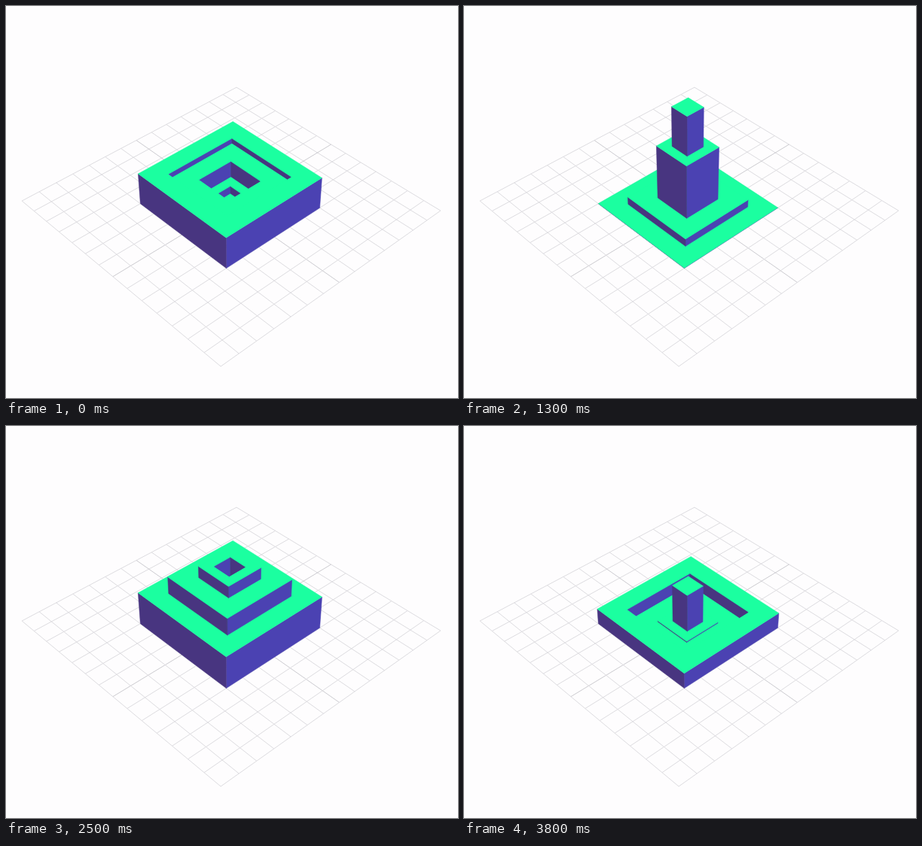
These frames come from a looping animation (600x521 px, 3.9 s). An HTML page with a canvas:

```html
<!DOCTYPE html>
<html lang="en">
<head>
<meta charset="utf-8">
<title>Nested square pistons</title>
<style>
  html, body { margin: 0; width: 100%; height: 100%; overflow: hidden; background: #fefdfe; }
  canvas { display: block; }
</style>
</head>
<body>
<canvas id="stage" width="600" height="521"></canvas>
<script>
const ctx = document.getElementById('stage').getContext('2d');

const LOOP = 3900, STEP = 100, GRID = 7;
const GREEN = '#1bffa0', BLUE = '#4b42b2', DARK = '#483580';

// Half width, half of the top height and phase lag of each ring, outermost first.
const RINGS = [
  { size: 3, amp: 1, lag: 0 },
  { size: 2, amp: 1.5, lag: 0.95 },
  { size: 1, amp: 3, lag: 1.9 },
  { size: 0.5, amp: 3, lag: 2.85 },
];

// Wave phase over time (ms, rad): about 3 rad/s with a slightly uneven pace.
const PHASE = [[0, -0.6], [400, 0.7], [900, 2.03], [1700, 4.56],
               [2500, 6.78], [3100, 8.7], [3800, 10.9], [3900, 11.2]];

function phaseAt(t) {
  const i = PHASE.findIndex(([time]) => time > t);
  const [t0, p0] = PHASE[i - 1], [t1, p1] = PHASE[i];
  return p0 + (p1 - p0) * (t - t0) / (t1 - t0);
}

// Perspective: u runs to the lower right, v to the lower left, h upwards.
function project([u, v, h]) {
  const w = 1 - 0.011286 * u - 0.010314 * v - 0.01306 * h;
  return [
    (297.1 + 15.766 * u - 23.64 * v - 3.92 * h) / w,
    (265.5 + 10.411 * u + 9.743 * v - 24.76 * h) / w,
  ];
}

function trace(...points) {
  ctx.beginPath();
  for (const p of points) ctx.lineTo(...project(p));
}

function face(color, ...points) {
  trace(...points);
  ctx.closePath();
  ctx.fillStyle = ctx.strokeStyle = color;
  ctx.lineWidth = 0.5;
  ctx.fill();
  ctx.stroke();
}

function gridLine(a, b, color) {
  trace(a, b);
  ctx.strokeStyle = color;
  ctx.lineWidth = 1;
  ctx.stroke();
}

function drawGrid() {
  const order = [...Array(2 * GRID + 1).keys()].map(i => i - GRID);
  for (const i of order) {
    const color = i ? '#dddce0' : '#cccbd0';
    gridLine([i, -GRID, 0], [i, GRID, 0], color);
    gridLine([-GRID, i, 0], [GRID, i, 0], color);
  }
}

// Walls with normals +u (blue) and +v (dark), standing at u = at and v = at.
function walls(s, at, low, high) {
  face(BLUE, [at, -s, low], [at, s, low], [at, s, high], [at, -s, high]);
  face(DARK, [-s, at, low], [s, at, low], [s, at, high], [-s, at, high]);
}

// Keep only what shows through a square opening or rises out of it.
function clipOpening(s, rim) {
  const sky = 12;
  trace([-s, s, rim], [s, s, rim], [s, -s, rim], [s, -s, sky], [-s, -s, sky], [-s, s, sky]);
  ctx.clip();
}

function draw(t) {
  const phase = phaseAt(t);
  ctx.fillStyle = '#fefdfe';
  ctx.fillRect(0, 0, 600, 521);
  drawGrid();

  ctx.save();
  let base = 0;
  for (const { size: s, amp, lag } of RINGS) {
    const top = amp * (1 + Math.cos(phase - lag));
    const sunken = top < base;
    if (sunken) clipOpening(s, base);
    walls(s, sunken ? -s : s, base, top);
    face(GREEN, [-s, -s, top], [s, -s, top], [s, s, top], [-s, s, top]);
    base = top;
  }
  ctx.restore();
}

const start = performance.now();
function tick() {
  const t = (performance.now() - start) % LOOP;
  draw(Math.floor(t / STEP) * STEP);
  requestAnimationFrame(tick);
}
tick();
</script>
</body>
</html>
```
